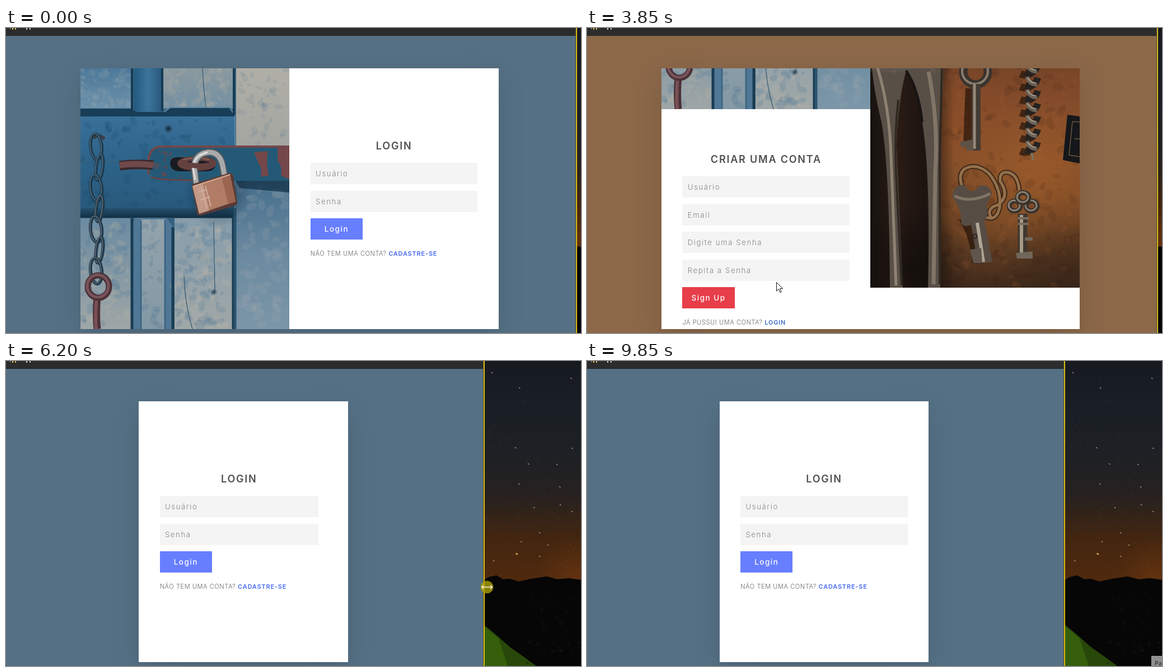
An HTML page with a canvas for the animation above (9.93 s loop, 1027 by 545 pixels).

```html
<!DOCTYPE html>
<html lang="pt-BR">
<head>
<meta charset="utf-8">
<title>Login</title>
<style>
  html, body { margin: 0; width: 100%; height: 100%; overflow: hidden; background: #060708; }
  body { position: relative; font-family: Inter, "Open Sans", sans-serif; }
  #stage { position: absolute; left: 0; top: 0; width: 1027px; height: 545px; overflow: hidden; }
  #stage > *, .card > * { position: absolute; }
  canvas { display: block; }
  #sky { left: 852px; top: 0; }
  #page { left: 0; top: 0; height: 545px; overflow: hidden; }
  .bar { position: absolute; left: 0; top: 0; width: 100%; height: 13px; background: #2c2c2c; border-bottom: 1px solid #222; }
  .bar i { position: absolute; top: 0; width: 2px; height: 3px; }
  .card { position: absolute; top: 71.5px; height: 466px; overflow: hidden; background: #fff; }
  #shadow { position: absolute; top: 71.5px; height: 466px; box-shadow: 0 14px 47px rgba(0, 0, 0, .13); }
  .form { box-sizing: border-box; top: 0; height: 466px; padding: 0 37.3px; background: #fff;
    display: flex; flex-direction: column; justify-content: center; }
  h2 { margin: 0 0 17px; font-size: 18px; line-height: 27px; font-weight: 600; letter-spacing: 1.8px;
    text-align: center; color: #505050; white-space: nowrap; }
  .field { box-sizing: border-box; height: 38px; margin-bottom: 11.4px; padding-left: 9.3px; background: #f4f4f4;
    font-size: 13.2px; line-height: 38px; font-weight: 300; letter-spacing: 1.6px; color: #858585; white-space: nowrap; overflow: hidden; flex: none; }
  .button { width: 93.3px; height: 38px; margin-bottom: 16.8px; flex: none; text-align: center; color: #fff;
    font-size: 13.5px; line-height: 38px; font-weight: 500; letter-spacing: 1.5px; }
  p { margin: 0; font-size: 11px; line-height: 16.8px; font-weight: 300; letter-spacing: .6px; color: #666; }
  p b { font-weight: 600; letter-spacing: .8px; color: #4a6cf0; }
  #signup p b { color: #3f6cc4; }
  #edge { top: 0; width: 3px; height: 545px; background: linear-gradient(90deg, #45453a 1px, #dcbc10 1px); }
  #tip { left: 1008px; top: 527px; width: 60px; height: 30px; box-sizing: border-box; padding: 5px 0 0 5px;
    background: #8f8f8f; border: 1px solid #a8a8a8; color: #1c1c1c; font: 11px/14px "Open Sans", sans-serif; }
  #pointer { left: 0; top: 0; overflow: visible; }
</style>
</head>
<body>
<div id="stage">
  <canvas id="sky" width="175" height="545"></canvas>
  <div id="page">
    <div class="bar">
      <i style="left:7px;background:#6d7f8a;height:2px"></i><i style="left:11px;background:#e0c040"></i>
      <i style="left:16px;background:#c8c070"></i><i style="left:36px;background:#c9c9e0"></i>
      <i style="left:42px;background:#b9b9d8"></i>
    </div>
    <div id="shadow"></div>
    <div class="card" id="card">
      <canvas id="door" width="374" height="466"></canvas>
      <canvas id="keys" width="374" height="466"></canvas>
      <div class="form" id="login">
        <h2>LOGIN</h2>
        <div class="field">Usuário</div>
        <div class="field">Senha</div>
        <div class="button" style="background:#677eff">Login</div>
        <p>NÃO TEM UMA CONTA? <b>CADASTRE-SE</b></p>
      </div>
      <div class="form" id="signup">
        <h2>CRIAR UMA CONTA</h2>
        <div class="field">Usuário</div>
        <div class="field">Email</div>
        <div class="field">Digite uma Senha</div>
        <div class="field">Repita a Senha</div>
        <div class="button" style="background:#e73e49">Sign Up</div>
        <p>JÁ PUSSUI UMA CONTA? <b>LOGIN</b></p>
      </div>
    </div>
  </div>
  <div id="edge"></div>
  <div id="tip">Parar</div>
  <svg id="pointer" width="1" height="1">
    <circle id="click" r="11.3" fill="#a89c00" fill-opacity=".82"/>
    <path id="arrow" d="M.5 .5V16L4.2 12.5L6.8 18.5L9.2 17.5L6.7 11.6H11.5Z" fill="#fff" stroke="#111"/>
    <path id="hand" d="M-1.5 12V2Q-1.5 .5 0 .5T1.5 2V7.5Q4.5 6.3 5 8.3Q7.5 7.5 8 9.3Q11 8.5 11 11.5V15Q11 18 9 21.5H0L-4.5 13.5Q-5 11.5-3.2 11Z" fill="#fff" stroke="#111"/>
    <path id="resize" d="M-9.5 0H9.5M-6-3.5L-9.5 0L-6 3.5M6-3.5L9.5 0L6 3.5" fill="none" stroke="#f6f3d8" stroke-width="1.3"/>
  </svg>
</div>
<script>
const LOOP = 9930, H = 466, HALF = 373.3, SLIDE = 500, NARROW_AT = 5875;
const $ = id => document.getElementById(id);

// ---- painting helpers ----
const seeded = s => () => (s = s * 16807 % 2147483647) / 2147483647;

function painter(id, seed) {
  const c = $(id).getContext('2d'), rnd = seeded(seed);
  const blend = (x0, y0, x1, y1, cols) => {
    const g = c.createLinearGradient(x0, y0, x1, y1);
    cols.forEach((col, i) => g.addColorStop(cols.length > 1 ? i / (cols.length - 1) : 0, col));
    return g;
  };
  return {
    c, rnd,
    rect(x, y, w, h, ...cols) { c.fillStyle = blend(0, y, 0, y + h, cols); c.fillRect(x, y, w, h); },
    across(x, y, w, h, ...cols) { c.fillStyle = blend(x, 0, x + w, 0, cols); c.fillRect(x, y, w, h); },
    shape(d, col) { c.fillStyle = col; c.fill(new Path2D(d)); },
    line(d, col, w = 1) { c.strokeStyle = col; c.lineWidth = w; c.stroke(new Path2D(d)); },
    ring(x, y, rx, ry, col, w, tilt = 0) {
      c.strokeStyle = col; c.lineWidth = w;
      c.beginPath(); c.ellipse(x, y, rx, ry, tilt, 0, 7); c.stroke();
    },
    glow(x, y, r, rgb, a) {
      const g = c.createRadialGradient(x, y, 0, x, y, r);
      g.addColorStop(0, `rgba(${rgb},${a})`); g.addColorStop(1, `rgba(${rgb},0)`);
      c.fillStyle = g; c.fillRect(x - r, y - r, 2 * r, 2 * r);
    },
    wear(n, x, y, w, h, col, size) {
      c.fillStyle = col;
      for (let i = 0; i < n; i++) {
        const r = size * (.3 + rnd());
        c.beginPath();
        c.ellipse(x + rnd() * w, y + rnd() * h, r * .6, r, rnd() * 3, 0, 7);
        c.fill();
      }
    }
  };
}

function paintDoor() {
  const p = painter('door', 41);
  p.rect(0, 0, 374, H, '#35617f');
  p.rect(0, 0, 90, 72, '#4c7899', '#6d91aa');
  p.rect(148, 0, 124, 72, '#8a999f', '#7390a3');
  p.rect(278, 0, 96, 142, '#b0afa7', '#a3a5a0');
  p.across(96, 0, 50, 78, '#235a80', '#3c749b', '#27587a');
  p.rect(0, 84, 276, 168, '#3b7199', '#2d6389', '#28597b');
  p.rect(0, 268, 90, 198, '#6b8ba1', '#9fa6a6');
  p.rect(168, 268, 104, 198, '#879dab', '#a0a7a7');
  p.rect(278, 200, 96, 266, '#456e8c', '#6b8aa0', '#7b96a7');
  p.shape('M100 260H148L166 284V466H92V280Z', '#507896');
  p.rect(108, 270, 42, 196, '#93a3ab', '#8499a5');
  // peeling paint
  p.wear(60, 0, 0, 88, 70, 'rgba(155,170,178,.18)', 7);
  p.wear(60, 150, 0, 120, 70, 'rgba(180,176,162,.2)', 8);
  p.wear(40, 280, 0, 92, 135, 'rgba(95,125,148,.16)', 7);
  p.wear(70, 2, 90, 270, 155, 'rgba(20,62,92,.16)', 8);
  p.wear(45, 2, 280, 86, 180, 'rgba(70,115,150,.2)', 9);
  p.wear(45, 0, 280, 86, 180, 'rgba(185,180,165,.25)', 8);
  p.wear(70, 170, 275, 98, 185, 'rgba(68,114,150,.2)', 9);
  p.wear(50, 170, 275, 98, 185, 'rgba(190,184,168,.22)', 9);
  p.wear(60, 282, 215, 90, 245, 'rgba(165,174,176,.17)', 10);
  p.wear(25, 110, 275, 38, 185, 'rgba(70,112,145,.2)', 8);
  // joints and shadows
  p.shape('M0 72H90L100 78H150L160 70H268L277 86H0Z', '#173d57');
  p.line('M0 71H88M150 78L160 70H266L276 84V250', '#6189a5', 2);
  p.rect(0, 250, 276, 17, '#25506e', '#132f42');
  p.line('M92 0V76M146 0V76M274 0V84', '#153a52', 4);
  p.line('M92 268V466M165 284V466M273 262V466', '#193c53', 5);
  p.line('M108 272V466M151 272V466', '#3d6684', 3);
  p.line('M276 250V466', '#2a536f', 5);
  p.line('M218 0Q220 40 224 70M238 275L240 400M185 370Q186 420 200 466M0 168H120', '#395d74', 1.3);
  p.glow(238, 400, 6, '30,52,70', .9);
  p.shape('M276 198H374V222L284 214Z', 'rgba(16,46,68,.7)');
  p.glow(245, 225, 60, '10,32,48', .6);
  p.glow(157, 108, 8, '18,38,52', 1);
  // bolt
  p.shape('M120 158Q122 140 142 140H374V201H145Q118 200 120 158Z', '#235977');
  p.line('M122 190Q116 142 142 140H374', '#74474a', 4);
  p.line('M126 194Q136 200 210 200', '#6b4245', 3);
  p.shape('M310 150L335 148Q331 168 336 192L322 194Q325 178 318 170ZM352 141H374V199L358 192Q361 175 352 166Z', '#75474a');
  p.wear(40, 126, 145, 90, 50, 'rgba(116,70,72,.5)', 4);
  p.shape('M160 170Q160 159 174 159H231Q243 163 242 171Q240 183 228 184H174Q161 182 160 170Z', '#181b22');
  p.line('M70 174Q100 170 130 173', '#39272a', 17);
  p.line('M70 173Q100 169 130 173', '#70494a', 11);
  p.ring(208, 170, 31, 9, '#64413f', 8);
  p.line('M184 163Q205 158 230 163', '#8b6259', 2);
  // padlock
  p.line('M207 208L203 176Q205 153 228 150Q249 149 254 174L258 196', '#52565c', 13);
  p.line('M207 208L203 176Q205 153 228 150Q249 149 254 174L258 196', '#a9aaab', 9);
  p.line('M205 200L201 176Q203 156 227 150', '#dedfdd', 3);
  p.line('M181 169Q208 178 237 172', '#64413f', 9);
  p.shape('M199 211Q199 207 203 206L266 187Q271 187 273 192L280 239Q280 244 275 246L215 263Q209 264 208 258Z', '#593b36');
  p.shape('M200 211L267 189L277 238L212 260Z', '#b07c65');
  p.shape('M200 211L218 205L230 254L212 260Z', '#c39a87');
  p.shape('M252 194L267 189L277 238L264 243Z', '#9b6550');
  p.line('M216 212L226 250M223 210L233 247M211 221L226 217M214 235L231 230', '#d0aea0', 2);
  p.line('M201 211L267 190', '#d6ad98', 2);
  // chain and ring
  p.line('M22 125Q30 116 43 126', '#3b3e4a', 6);
  for (let i = 0; i < 7; i++) {
    const y = 140 + i * 37, odd = i % 2;
    p.ring(31 + (odd ? 3 : -3), y, odd ? 6 : 10, 23, '#1d394c', 6, odd ? .12 : -.1);
    p.ring(30 + (odd ? 3 : -3), y - 1, odd ? 6 : 10, 23, i < 3 ? '#486579' : '#5a646d', 2, odd ? .12 : -.1);
  }
  p.line('M30 408Q27 438 30 466', '#4b3137', 13);
  p.line('M29 408Q26 438 28 466', '#785055', 6);
  p.ring(32, 390, 19, 20, '#4b3137', 11);
  p.ring(31, 389, 19, 20, '#78525a', 5);
}

function paintKeys() {
  const p = painter('keys', 97);
  p.rect(0, 0, 374, H, '#6a3f22', '#80492a', '#87502a', '#764825', '#3f2a1c');
  p.glow(300, 260, 150, '170,98,42', .5);
  p.glow(170, 170, 90, '150,82,38', .45);
  p.glow(360, 430, 130, '38,27,20', .4);
  p.wear(170, 130, 0, 244, H, 'rgba(48,26,14,.12)', 9);
  p.wear(110, 130, 0, 244, H, 'rgba(190,112,56,.1)', 7);
  p.across(0, 0, 150, H, '#17120f', '#2a1b14', '#1c1410', 'rgba(40,24,15,0)');
  p.glow(75, 430, 110, '12,10,9', .6);
  // pliers
  p.shape('M2 0H130V110Q118 180 126 H125V466H103Q108 260 92 165Q82 100 64 78Q50 130 47 210L58 466H35Q34 250 20 170Q5 110 2 60Z'.replace('126 H125', '126 250L125 300'), '#584f47');
  p.shape('M2 0H130V60L64 78Q14 90 2 60Z', '#5d554e');
  p.line('M12 70Q34 140 37 230L46 462', '#8e8273', 5);
  p.line('M50 130Q43 190 46 260L56 462', '#302923', 4);
  p.line('M104 80Q122 170 116 260L113 460', '#817568', 7);
  p.line('M128 70L124 240V460', '#312922', 4);
  p.line('M64 78Q86 110 93 170', '#181412', 4);
  p.wear(60, 5, 5, 120, 75, 'rgba(135,124,110,.18)', 6);
  // tall key
  p.line('M182 110L178 210', 'rgba(20,10,5,.6)', 24);
  p.ring(188, 80, 22, 23, '#3a332e', 15);
  p.ring(187, 79, 23, 23, '#8a7d6e', 4);
  p.line('M189 102V221', '#443b34', 16);
  p.line('M186 102V218', '#96897a', 5);
  p.shape('M160 206L184 201V221H172V215H162Z', '#5e5349');
  // corkscrew
  p.line('M285 0V70', '#39302a', 14);
  for (let y = 66; y < 220; y += 23) {
    p.line(`M268 ${y + 18}Q285 ${y + 25} 292 ${y + 8}`, 'rgba(22,11,6,.6)', 13);
    p.line(`M277 ${y + 16}Q294 ${y + 20} 299 ${y + 2}`, '#262220', 12);
    p.line(`M280 ${y}Q284 ${y + 14} 298 ${y + 14}`, '#6d6359', 7);
    p.line(`M281 ${y + 2}Q287 ${y + 11} 295 ${y + 11}`, '#aaa08f', 2);
  }
  p.line('M288 225L291 238', '#7c7061', 4);
  // box
  p.shape('M352 157L374 160V244L344 238Z', '#15171a');
  p.line('M374 170L361 169L355 229L374 232M374 200H364', '#6a573d', 1.5);
  // twine
  for (const [col, w] of [['#3b2819', 9], ['#94704b', 5]]) {
    p.line('M172 300Q152 268 168 254Q190 242 212 262Q235 290 231 322Q226 348 206 340', col, w);
    p.line('M216 342Q206 324 228 318Q250 302 232 276Q230 258 246 260Q264 264 266 292', col, w);
  }
  // short keys
  p.shape('M158 344Q178 374 182 422L200 424L194 340Z', 'rgba(18,9,5,.55)');
  p.shape('M147 304Q146 284 166 282L176 292Q186 298 194 284Q214 280 217 298L208 318Q212 338 204 346L218 420L192 423L180 354Q162 360 162 346Q164 330 147 304Z', '#574c43');
  p.line('M150 302Q178 316 214 298', '#807466', 5);
  p.line('M191 350L202 420', '#b0a493', 6);
  p.shape('M178 398L198 395L200 422H184Z', '#60564c');
  p.ring(187, 374, 3, 4, '#2b241f', 2);
  for (const [x, y] of [[258, 320], [288, 320], [273, 305]]) {
    p.ring(x, y, 10, 9, '#3b332d', 9);
    p.ring(x - 1, y - 1, 10, 9, '#8d8172', 3);
  }
  p.line('M272 334L272 412', '#40372f', 17);
  p.line('M270 336L270 410', '#a69a88', 6);
  p.line('M263 342H283M264 352H282', '#776b5e', 4);
  p.shape('M260 404L290 401V414H262ZM276 376H290V382H276Z', '#71665a');
}

function paintSky() {
  const p = painter('sky', 7);
  p.c.translate(-852, 0);
  p.rect(852, 0, 175, 400, '#161a20', '#1a1f25', '#1d2025', '#262120', '#44260f', '#512a0e');
  p.glow(1015, 385, 70, '140,70,20', .3);
  for (let i = 0; i < 110; i++) {
    p.c.fillStyle = `rgba(175,165,160,${.08 + p.rnd() * .3})`;
    p.c.fillRect(852 + p.rnd() * 175, p.rnd() * 370, 1.4, 1);
  }
  const stars = [[868, 21], [917, 48], [1009, 31], [910, 155], [933, 184], [1011, 156], [984, 185], [989, 225],
    [943, 262], [990, 257], [916, 220], [1011, 269], [953, 307], [920, 323], [968, 329], [953, 349], [871, 357]];
  for (const [x, y] of stars) p.line(`M${x - 1} ${y - .7}L${x + 1.4} ${y + .7}`, '#c0aaa0', 1.2);
  p.line('M910.5 344L914 345.5', '#e0c848', 2.2);
  p.shape('M852 392L862 386L876 383L888 390L900 389L916 394L938 389L966 385L985 390L1005 388L1027 391V545H852Z', '#060606');
  p.shape('M852 470L868 483L900 511L924 528L947 545H852Z', p.c.fillStyle = '#28480a');
  p.shape('M852 472L880 496L896 545H852Z', '#355f0b');
  p.wear(50, 930, 420, 95, 120, 'rgba(26,26,24,.35)', 3);
}

paintDoor(); paintKeys(); paintSky();

// ---- motion ----
// cubic-bezier(.25, .1, .25, 1)
function ease(x) {
  if (x <= 0) return 0;
  if (x >= 1) return 1;
  const bez = (a, b, s) => 3 * a * s * (1 - s) ** 2 + 3 * b * s * s * (1 - s) + s ** 3;
  let lo = 0, hi = 1;
  for (let i = 0; i < 24; i++) {
    const mid = (lo + hi) / 2;
    if (bez(.25, .25, mid) < x) lo = mid; else hi = mid;
  }
  return bez(.1, 1, lo);
}

// time, x, y of the pointer's hot spot
const PATH = [
  [210, 946, 506], [520, 900, 462], [850, 805, 418], [1140, 751, 399], [1440, 751, 398], [2380, 751, 398],
  [2700, 500, 362], [3000, 200, 342], [3080, 175, 350], [3220, 250, 425], [3320, 330, 458], [3390, 338, 454],
  [3880, 338, 454], [4310, 1045, 380], [4940, 1026, 376], [5170, 1025, 376], [5340, 1024, 374.5],
  [5470, 1024, 374.5], [6180, 859, 404], [6300, 859, 404], [6440, 814, 407], [6700, 640, 367], [6970, 477, 402],
  [7140, 477, 398], [7640, 477, 398], [8290, 444, 449], [8620, 444, 449], [8980, 452, 560]
];
const within = (t, spans) => spans.some(([a, b]) => t >= a && t < b);
const SHOWN = [[210, 4320], [4940, 8980]];
const HAND = [[1140, 2080], [3350, 3800], [7140, 7340], [8370, 8590]];
const RESIZE = [[4940, 6330]];
const CLICK = [[1920, 2060], [3540, 3780], [5340, 6300], [7220, 7350], [8440, 8600]];

function pointerAt(t) {
  const i = PATH.findIndex(k => k[0] > t);
  if (i < 1) return PATH[i < 0 ? PATH.length - 1 : 0].slice(1);
  const [t0, x0, y0] = PATH[i - 1], [t1, x1, y1] = PATH[i], f = (t - t0) / (t1 - t0);
  return [x0 + (x1 - x0) * f, y0 + (y1 - y0) * f];
}

const show = (id, on) => { $(id).style.display = on ? '' : 'none'; };
function place(id, x, y, w) {
  const s = $(id).style;
  s.left = x + 'px'; s.top = y + 'px';
  if (w) s.width = w + 'px';
}

function draw(t) {
  const slide = start => ease((t - start) / SLIDE);
  const p = slide(2043) - slide(3783) + slide(7300) - slide(8565);
  const [x, y] = pointerAt(t);
  const edge = t < 5470 ? 1017 : t < 6300 ? x - 7 : 851;
  const narrow = t >= NARROW_AT;
  const formW = narrow ? HALF * (.5 + .5 * slide(NARROW_AT)) : HALF;
  const cardW = narrow ? HALF : 2 * HALF;

  const mix = (a, b) => Math.round(a + (b - a) * p);
  $('page').style.background = `rgb(${mix(85, 150)},${mix(112, 103)},${mix(133, 62)})`;
  $('page').style.width = edge + 'px';
  $('edge').style.left = edge + 'px';
  for (const id of ['card', 'shadow']) {
    $(id).style.left = (edge - 4 - cardW) / 2 + 'px';
    $(id).style.width = cardW + 'px';
  }
  show('door', !narrow);
  show('keys', !narrow);
  place('door', 0, -p * H);
  place('keys', HALF, (p - 1) * H);
  place('login', narrow ? 0 : HALF, p * H, formW);
  place('signup', 0, (1 - p) * H, formW);

  const hand = within(t, HAND), resize = within(t, RESIZE);
  show('pointer', within(t, SHOWN));
  show('hand', hand);
  show('resize', resize);
  show('arrow', !hand && !resize);
  show('click', within(t, CLICK));
  $('pointer').style.transform = `translate(${x}px,${y}px)`;
  show('tip', t >= 9840);
}

const begin = performance.now();
function tick() {
  draw((performance.now() - begin) % LOOP);
  requestAnimationFrame(tick);
}
draw(0);
requestAnimationFrame(tick);
</script>
</body>
</html>
```
